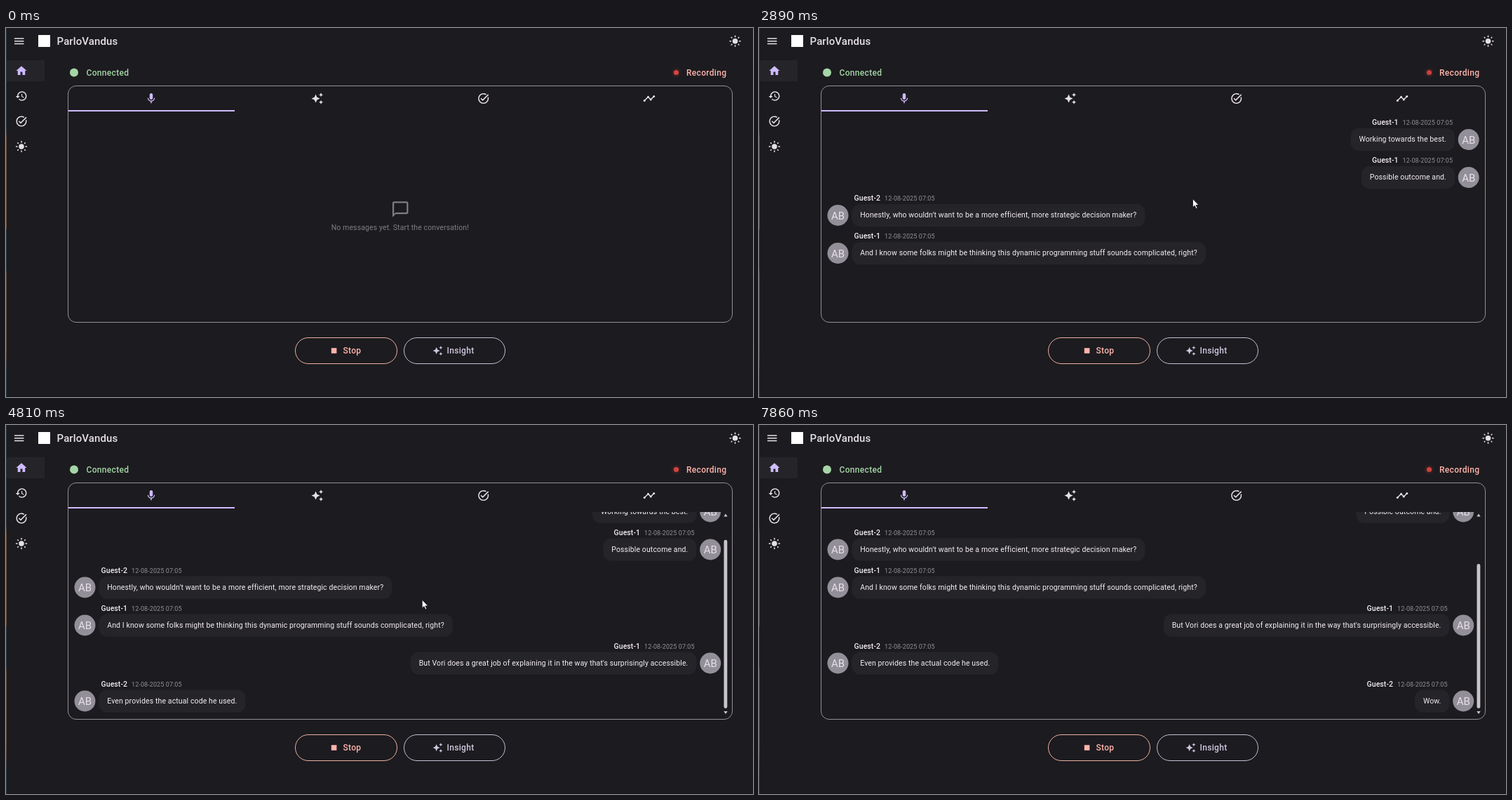
An HTML page for the animation above (7.99 s loop, 1065 px wide and 526 px high).

```html
<!DOCTYPE html>
<html lang="en">
<head>
<meta charset="utf-8">
<title>Conversation</title>
<style>
  html, body { margin: 0; width: 100%; height: 100%; overflow: hidden; background: #1c1b1f; }
  svg { display: block; width: 1065px; height: 526px; font: 10.5px Roboto, sans-serif; letter-spacing: .1125px; }
  .label { font-size: 12px; font-weight: 500; letter-spacing: .32px; }
  .name { font-weight: 500; letter-spacing: .075px; }
  .date { font-size: 9px; font-weight: 400; letter-spacing: .1px; fill: #939097; }
  .initials { font-size: 15px; letter-spacing: 0; text-anchor: middle; fill: #e6e1e5; }
</style>
</head>
<body>
<svg id="stage" viewBox="0 0 1065 526">
  <defs>
    <clipPath id="view"><rect x="89" y="124" width="947" height="288"/></clipPath>
    <radialGradient id="halo">
      <stop offset=".45" stop-color="#e0443e" stop-opacity=".16"/>
      <stop offset="1" stop-color="#e0443e" stop-opacity="0"/>
    </radialGradient>
    <linearGradient id="edge" x2="0" y2="1">
      <stop offset="0" stop-color="#2b3540"/><stop offset=".27" stop-color="#2b3540"/>
      <stop offset=".3" stop-color="#75543f"/><stop offset=".54" stop-color="#75543f"/>
      <stop offset=".55" stop-color="#2b3d4c"/><stop offset=".65" stop-color="#2b3d4c"/>
      <stop offset=".67" stop-color="#6b4d3c"/><stop offset=".87" stop-color="#6b4d3c"/>
      <stop offset=".94" stop-color="#2b3d4c"/><stop offset="1" stop-color="#2b3d4c"/>
    </linearGradient>
  </defs>

  <rect width="1065" height="526" fill="#1c1b1f"/>
  <rect y="46" width="55" height="30" fill="#252429"/>
  <rect y="525" width="1065" height="1" fill="#131216"/>
  <rect width="1" height="526" fill="url(#edge)"/>

  <rect x="46" y="10" width="17" height="17" fill="#fff"/>
  <text x="72.5" y="24" fill="#e6e1e5" font-size="15" font-weight="500">ParloVandus</text>

  <circle cx="97" cy="63.5" r="6" fill="#a5d6a7"/>
  <text class="label" x="114.5" y="67.5" fill="#a5d6a7">Connected</text>
  <circle id="glow" cx="955.5" cy="63.5" r="8" fill="url(#halo)"/>
  <circle id="dot" cx="955.5" cy="63.5" r="3.6"/>
  <text class="label" x="970" y="67.5" fill="#ffb4ab">Recording</text>

  <rect x="88.5" y="82.5" width="947" height="337" rx="11.5" fill="none" stroke="#938f99"/>
  <rect x="89" y="117" width="237" height="2" fill="#cfbcff"/>

  <g fill="none">
    <rect x="412.5" y="441.5" width="145" height="37" rx="18.5" stroke="#eab0a4"/>
    <rect x="567.5" y="441.5" width="144" height="37" rx="18.5" stroke="#c5bfd2"/>
  </g>
  <rect x="463.8" y="456.2" width="7.6" height="7.6" fill="#ffb4ab"/>
  <text class="label" x="480.5" y="464" fill="#ffb4ab">Stop</text>
  <text class="label" x="628.5" y="464" fill="#d0c8e0">Insight</text>

  <g id="icons"></g>
  <g id="empty" fill="#7f7e82"><text x="463.7" y="288">No messages yet. Start the conversation!</text></g>
  <g clip-path="url(#view)"><g id="list"></g></g>
  <g id="bar" fill="#c8c6ca">
    <path d="M1023.3 130.5h5.4l-2.7-4zM1023.3 408h5.4l-2.7 4z"/>
    <rect id="thumb" x="1023.5" width="4.8" rx="2.4"/>
  </g>
  <path id="cursor" d="M0 0v12.2l2.8-2.6 2 4.4 1.9-.9-2-4.2h3.9z" fill="#fff" stroke="#0b0b0d" stroke-width=".8"/>
</svg>

<script>
const $ = id => document.getElementById(id);
const LOOP = 7990, ROW = 54, VIEW = 288, TRACK = 270;

// Icon outlines on a 24-unit grid
const paths = {
  menu: 'M3 18h18v-2H3zm0-5h18v-2H3zm0-7v2h18V6z',
  home: 'M10 20v-6h4v6h5v-8h3L12 3 2 12h3v8z',
  history: 'M13 3c-4.97 0-9 4.03-9 9H1l3.89 3.89.07.14L9 12H6c0-3.87 3.13-7 7-7s7 3.13 7 7-3.13 7-7 7c-1.93 0-3.68-.79-4.94-2.06l-1.42 1.42C8.27 19.99 10.51 21 13 21c4.97 0 9-4.03 9-9s-4.03-9-9-9zm-1 5v5l4.28 2.54.72-1.21-3.5-2.08V8z',
  task: 'M22 5.18 10.59 16.6l-4.24-4.24 1.41-1.41 2.83 2.83 10-10zm-2.21 5.04c.13.57.21 1.17.21 1.78 0 4.42-3.58 8-8 8s-8-3.58-8-8 3.58-8 8-8c1.58 0 3.04.46 4.28 1.25l1.44-1.44C16.1 2.67 14.13 2 12 2 6.48 2 2 6.48 2 12s4.48 10 10 10 10-4.48 10-10c0-1.19-.22-2.33-.6-3.39z',
  mic: 'M12 14c1.66 0 3-1.34 3-3V5c0-1.66-1.34-3-3-3S9 3.34 9 5v6c0 1.66 1.34 3 3 3zm5.3-3c0 3-2.54 5.1-5.3 5.1S6.7 14 6.7 11H5c0 3.41 2.72 6.23 6 6.72V21h2v-3.28c3.28-.48 6-3.3 6-6.72z',
  sparkle: 'M19 9l1.25-2.75L23 5l-2.75-1.25L19 1l-1.25 2.75L15 5l2.75 1.25zm-7.5.5L9 4 6.5 9.5 1 12l5.5 2.5L9 20l2.5-5.5L17 12zM19 15l-1.25 2.75L15 19l2.75 1.25L19 23l1.25-2.75L23 19l-2.75-1.25z',
  bubble: 'M20 2H4c-1.1 0-2 .9-2 2v18l4-4h14c1.1 0 2-.9 2-2V4c0-1.1-.9-2-2-2zm0 14H6l-2 2V4h16z'
};

function icon(shape, cx, cy, color = '#e6e1e5', size = 18) {
  return `<g transform="translate(${cx - size / 2} ${cy - size / 2}) scale(${size / 24})" fill="${color}">${shape}</g>`;
}
const glyph = (name, ...rest) => icon(`<path d="${paths[name]}"/>`, ...rest);

const rays = [...Array(8).keys()].map(i =>
  `<path d="M12 2v${i % 2 ? 1.3 : 2}" transform="rotate(${i * 45} 12 12)" stroke="#e6e1e5" stroke-width="2" stroke-linecap="round"/>`).join('');
const sun = '<circle cx="12" cy="12" r="5"/>' + rays;
const chart = '<path d="M3 16L10 9l5 5 6-6" fill="none" stroke="#e6e1e5" stroke-width="2"/>' +
  [[3, 16], [10, 9], [15, 14], [21, 8]].map(([x, y]) => `<circle cx="${x}" cy="${y}" r="2"/>`).join('');

$('icons').innerHTML =
  glyph('menu', 18.7, 18.7) + icon(sun, 1039.5, 18.7) +
  glyph('home', 22, 61, '#cfbcff') + glyph('history', 22, 97) +
  glyph('task', 22, 133) + icon(sun, 22, 169) +
  glyph('mic', 207, 100.5, '#cfbcff') + glyph('sparkle', 443.8, 100.5) +
  glyph('task', 680.7, 100.5) + icon(chart, 917, 100.5) +
  glyph('sparkle', 615.5, 460, '#d0c8e0', 15);
$('empty').innerHTML += glyph('bubble', 562.2, 258.4, '#7f7e82', 27);

// Arrival time, speaker, side, text
const messages = [
  [790, 1, 'right', 'Working towards the best.'],
  [1180, 1, 'right', 'Possible outcome and.'],
  [1440, 2, 'left', "Honestly, who wouldn't want to be a more efficient, more strategic decision maker?"],
  [2885, 1, 'left', 'And I know some folks might be thinking this dynamic programming stuff sounds complicated, right?'],
  [3640, 1, 'right', "But Vori does a great job of explaining it in the way that's surprisingly accessible."],
  [4420, 2, 'left', 'Even provides the actual code he used.'],
  [6285, 2, 'right', 'Wow.']
].map(([at, guest, side, text], i) => {
  const right = side === 'right';
  const anchor = right ? 'end' : 'start';
  const node = document.createElementNS('http://www.w3.org/2000/svg', 'g');
  node.innerHTML = `
    <text class="name" x="${right ? 989.2 : 135.5}" y="138.3" fill="#f4eff4" text-anchor="${anchor}">Guest-${guest}<tspan class="date" dx="6">12-08-2025 07:05</tspan></text>
    <rect y="143" height="32.3" rx="12" fill="#252428"/>
    <text class="body" x="${right ? 980 : 144.2}" y="162.3" fill="#f4eff4" text-anchor="${anchor}">${text}</text>
    <circle cx="${right ? 1011.7 : 112.5}" cy="159" r="15" fill="#938f99"/>
    <text class="initials" x="${right ? 1011.7 : 112.5}" y="164.5">AB</text>`;
  $('list').append(node);
  const width = node.querySelector('.body').getComputedTextLength() + 24;
  const box = node.querySelector('rect');
  box.setAttribute('width', width);
  box.setAttribute('x', right ? 992 - width : 132.3);
  return { at, right, node, y: i * ROW };
});

const clamp = v => Math.min(1, Math.max(0, v));
const ease = (t, from, to) => { const k = clamp((t - from) / (to - from)); return k * k * (3 - 2 * k); };
const mix = (a, b, k) => a + (b - a) * k;
const show = (node, on) => node.setAttribute('visibility', on ? 'visible' : 'hidden');

function drawList(t) {
  const count = messages.filter(m => t >= m.at).length;
  const overflow = Math.max(0, 35.5 + (count - 6) * ROW);
  const scroll = 35.5 * ease(t, 4420, 4550) + ROW * ease(t, 6285, 6415);
  const scrolls = overflow > 0;
  show($('empty'), !count);
  show($('bar'), scrolls);
  for (const m of messages) {
    show(m.node, t >= m.at);
    m.node.setAttribute('transform', `translate(${m.right && scrolls ? -7.5 : 0} ${m.y - scroll})`);
  }
  const scale = TRACK / (VIEW + overflow);
  $('thumb').setAttribute('y', 134 + scroll * scale);
  $('thumb').setAttribute('height', VIEW * scale);
}

function drawCursor(t) {
  const nudge = ease(t, 3480, 3780), leave = ease(t, 7260, 7760);
  const x = mix(mix(618.4, 593.2, nudge), 428, leave);
  const y = mix(mix(243.6, 249, nudge), 530, leave);
  show($('cursor'), t >= 1180 && leave < 1);
  $('cursor').setAttribute('transform', `translate(${x} ${y})`);
}

function drawDot(t) {
  const k = (1 + Math.cos((t - 150) / 1500 * 2 * Math.PI)) / 2;
  $('dot').setAttribute('fill', `rgb(${mix(152, 217, k)},${mix(41, 71, k)},${mix(40, 66, k)})`);
  $('glow').setAttribute('opacity', mix(.5, 1, k));
}

function frame(now) {
  const t = now % LOOP;
  drawList(t);
  drawCursor(t);
  drawDot(t);
  requestAnimationFrame(frame);
}
requestAnimationFrame(frame);
</script>
</body>
</html>
```
